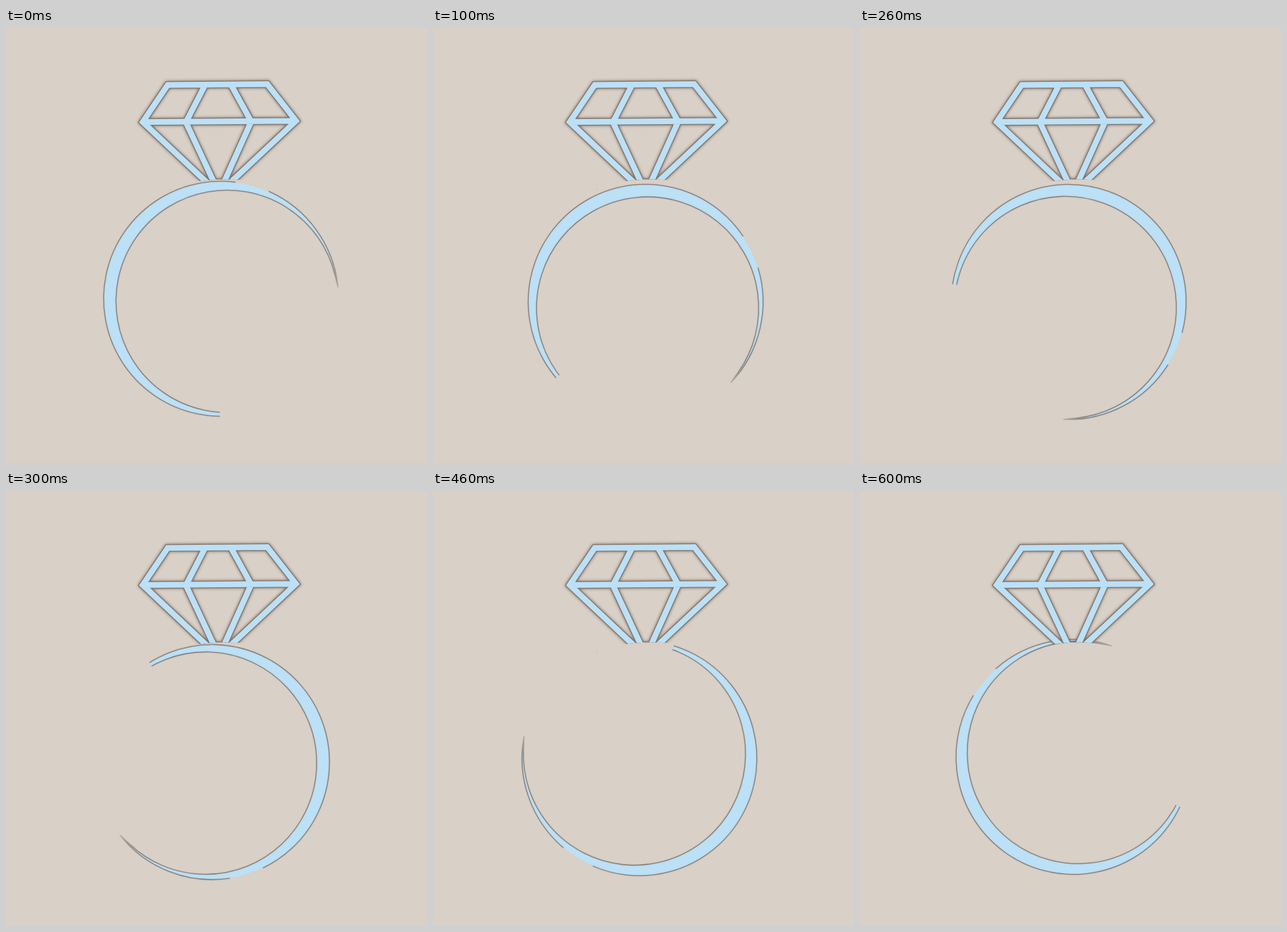
An HTML page with a canvas for the animation above (0.7 s loop, 736 px wide and 760 px high).

```html
<!DOCTYPE html>
<html lang="en">
<head>
<meta charset="utf-8">
<title>Diamond ring</title>
<style>
  html, body { margin: 0; width: 100%; height: 100%; overflow: hidden; background: #d9d0c7; }
  canvas { display: block; }
</style>
</head>
<body>
<canvas id="stage" width="736" height="760"></canvas>
<script>
const ctx = document.getElementById('stage').getContext('2d');
const BG = '#d9d0c7', ICE = '#bce0f6', EDGE = '#85796f';
const STEPS = 7, STEP_MS = 100, STEP_DEG = 49.1;
const rad = deg => deg * Math.PI / 180;

// Band: outer circle minus a shifted inner circle, turning about an off-centre pivot
const pivot = { x: 368, y: 471 };
const outer = { x: 8, y: 2, r: 205.3 };
const shift = 11.4, shiftDir = rad(23.5);
const inner = {
  x: outer.x + shift * Math.cos(shiftDir),
  y: outer.y + shift * Math.sin(shiftDir),
  r: 194.2
};
const tail = rad(90.5), beforeTail = rad(80);
const taper = rad(346), tip = rad(354.5);
const wornFrom = rad(277), wornTo = rad(294);

// Diamond: centre lines of equal struts
const STRUT = 11.5;
const girdleL = [239, 164.2], girdleR = [507, 162.3];
const gem = new Path2D();

function strut(...points) {
  points.forEach(([x, y], i) => i ? gem.lineTo(x, y) : gem.moveTo(x, y));
}

strut([356.7, 275], girdleL, [282.8, 99.5], [456.7, 98], girdleR, [386.5, 275.3]);
strut(girdleL, girdleR);
strut([348.4, 99], [314.5, 164.7], [366, 274.7]);
strut([393, 98.5], [428.7, 163.4], [378.5, 275]);
strut([361, 269.5], [384, 269.5]);

function setShadow(color, blur) {
  ctx.shadowColor = color;
  ctx.shadowBlur = blur;
}

function circleArc(c, from, to, inset = 0) {
  ctx.arc(c.x, c.y, c.r - inset, from, to, to < from);
}

function strokeArc(c, from, to) {
  ctx.beginPath();
  circleArc(c, from, to);
  ctx.stroke();
}

function fadingEdge() {
  const turn = angle => (angle - tail) / (2 * Math.PI);
  const edge = ctx.createConicGradient(tail, outer.x, outer.y);
  edge.addColorStop(0, EDGE);
  edge.addColorStop(turn(taper), EDGE);
  edge.addColorStop(turn(tip), EDGE + '30');
  return edge;
}

function drawBand(angle) {
  ctx.save();
  ctx.translate(pivot.x, pivot.y);
  ctx.rotate(angle);

  // Square cut at the tail
  ctx.beginPath();
  ctx.moveTo(outer.x, outer.y);
  ctx.arc(outer.x, outer.y, 260, tail, tip + 0.05);
  ctx.closePath();
  ctx.clip();

  ctx.beginPath();
  circleArc(outer, beforeTail, wornFrom);
  circleArc(outer, wornFrom, wornTo, 0.8);
  circleArc(outer, wornTo, tip);
  circleArc(inner, taper, beforeTail);
  ctx.closePath();
  ctx.fillStyle = ICE;
  ctx.fill();

  ctx.strokeStyle = fadingEdge();
  ctx.lineWidth = 1.3;
  setShadow('rgba(80, 66, 55, 0.4)', 2);
  strokeArc(outer, beforeTail, wornFrom);
  strokeArc(outer, wornTo, tip);
  ctx.beginPath();
  circleArc(inner, beforeTail, taper);
  ctx.lineTo(outer.x + outer.r * Math.cos(tip), outer.y + outer.r * Math.sin(tip));
  ctx.stroke();
  ctx.restore();
}

function drawDiamond() {
  ctx.save();
  // The base follows the curve of the band
  ctx.beginPath();
  ctx.moveTo(200, 60);
  ctx.lineTo(550, 60);
  ctx.lineTo(550, 265.5);
  ctx.lineTo(410, 265.5);
  ctx.quadraticCurveTo(372, 262.5, 338, 267.5);
  ctx.lineTo(200, 267.5);
  ctx.closePath();
  ctx.clip();

  ctx.lineJoin = 'miter';
  ctx.strokeStyle = EDGE;
  ctx.lineWidth = STRUT + 1.6;
  setShadow('rgba(70, 55, 45, 0.7)', 5);
  ctx.stroke(gem);
  setShadow('transparent', 0);
  ctx.strokeStyle = ICE;
  ctx.lineWidth = STRUT - 1.6;
  ctx.stroke(gem);
  ctx.restore();
}

function draw(ms) {
  const step = Math.floor(ms / STEP_MS) % STEPS;
  ctx.fillStyle = BG;
  ctx.fillRect(0, 0, 736, 760);
  ctx.fillStyle = '#c3b8ae';
  ctx.fillRect(286, 281.5, 2, 1.2);
  drawBand(rad(step * STEP_DEG));
  drawDiamond();
}

const start = performance.now();
function tick() {
  draw(performance.now() - start);
  requestAnimationFrame(tick);
}
tick();
</script>
</body>
</html>
```
